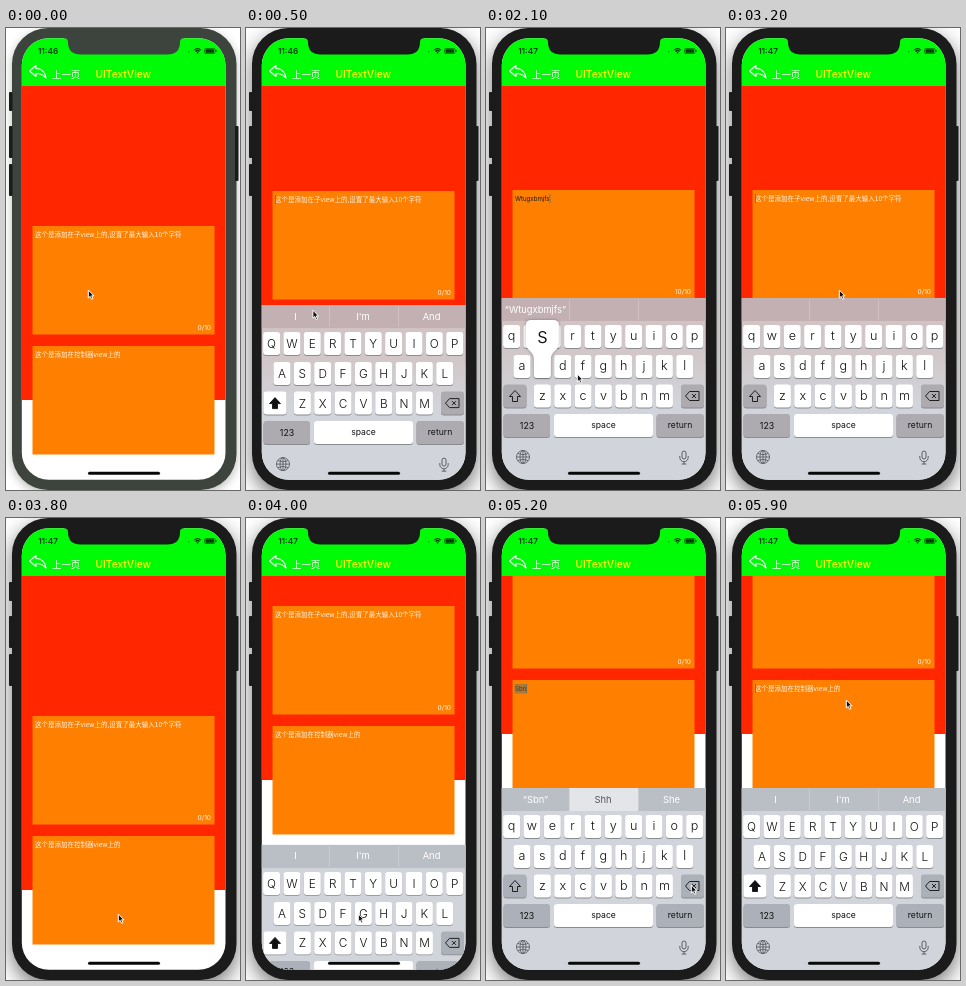
An HTML page with a canvas that plays this animation: 234 by 462 pixels, repeating every 6000 ms.

```html
<!DOCTYPE html>
<html lang="zh">
<head>
<meta charset="utf-8">
<title>UITextView</title>
<style>
html, body { margin: 0; width: 100%; height: 100%; overflow: hidden; background: #fff; }
canvas { display: block; width: 234px; height: 462px; }
</style>
</head>
<body>
<canvas id="stage" width="234" height="462"></canvas>
<script>
const g = document.getElementById('stage').getContext('2d');
const LOOP = 6000, STEP = 100;
const SANS = 'Inter, "Noto Sans CJK SC", "Noto Sans CJK", sans-serif';
const CJK = '"Noto Sans CJK SC", "Noto Sans CJK", sans-serif';
const ROWS = [
  { keys: 'qwertyuiop', x: 25.6, y: 297 },
  { keys: 'asdfghjkl', x: 36, y: 327 },
  { keys: 'zxcvbnm', x: 56.4, y: 356.5 }
];
const PITCH = 20.34, KEY_W = 17, KEY_H = 23;

// Each session: key presses [ms, letter], then held backspace.
const SESSIONS = [
  { open: 300, close: 3400, shift: 36, erase: 2400, rate: 60,
    presses: [[700, 'W'], [800, 't'], [900, 'u'], [1000, 'g'], [1100, 'x'],
              [1400, 'b'], [1500, 'm'], [1700, 'j'], [1800, 'f'], [2000, 's']] },
  { open: 3900, close: LOOP + 1000, shift: 156, erase: 4950, rate: 90,
    presses: [[4200, 'S'], [4300, 'b'], [4400, 'n'], [4500, 'h'], [4700, 'f']] }
];
const POINTER = [
  [0, 82, 262], [350, 82, 262], [700, 46, 309], [800, 87, 309], [900, 148, 309],
  [1000, 117, 338], [1100, 77, 367], [1200, 92, 370], [1300, 123, 371], [1400, 137, 367],
  [1500, 178, 367], [1700, 158, 338], [1800, 97, 338], [2000, 57, 338], [2100, 91, 346],
  [2350, 205, 367], [2950, 205, 367], [3200, 113, 262], [3400, 113, 262], [3800, 112, 396],
  [4000, 112, 396], [4200, 57, 338], [4300, 137, 367], [4400, 157, 367], [4500, 142, 354],
  [4700, 97, 338], [4950, 205, 367], [5400, 205, 367], [5800, 120, 182], [6000, 120, 182]
];

const clamp = v => Math.max(0, Math.min(1, v));
const easeOut = v => 1 - (1 - clamp(v)) ** 3;

function box(x, y, w, h, r, fill) {
  g.beginPath();
  g.roundRect(x, y, w, h, r);
  g.fillStyle = fill;
  g.fill();
}

function label(text, x, y, size, color, align = 'center', weight = 400, family = SANS) {
  g.font = `${weight} ${size}px ${family}`;
  g.textAlign = align;
  g.textBaseline = 'alphabetic';
  g.fillStyle = color;
  g.fillText(text, x, y);
}

function trace(d, color, width = 1, fill) {
  const path = new Path2D(d);
  if (fill) { g.fillStyle = fill; g.fill(path); }
  g.strokeStyle = color;
  g.lineWidth = width;
  g.lineJoin = 'round';
  g.stroke(path);
}

function sessionState(s, t) {
  const shown = easeOut((t - s.open) / 300) * (1 - easeOut((t - s.close) / 300));
  let text = s.presses.filter(p => t - p[0] >= 100).map(p => p[1]).join('');
  const erased = t > s.erase ? Math.floor((t - s.erase) / s.rate) : 0;
  text = text.slice(0, Math.max(0, text.length - erased));
  const pressed = s.presses.filter(p => t >= p[0] && t - p[0] < 200).pop();
  return { shown, text, pop: pressed && pressed[1], lift: shown * s.shift };
}

function drawPhone(active) {
  const body = active ? '#1b1b1b' : '#3d443e';
  g.fillStyle = '#fff';
  g.fillRect(0, 0, 234, 462);
  g.save();
  g.shadowColor = active ? 'rgba(0,0,0,.55)' : 'rgba(0,0,0,.28)';
  g.shadowBlur = active ? 20 : 10;
  g.shadowOffsetY = active ? 7 : 3;
  box(6, 0, 224.5, 462, 36, body);
  g.restore();
  [[3, 64, 19], [3, 98, 32], [3, 136, 32], [229, 98, 55]].forEach(
    ([x, y, h]) => box(x, y, 3.5, h, 1, '#1b1b1b'));
  return body;
}

function drawField(y, hint, text, lift, focused, counter, marked) {
  const top = Math.round(y - lift);
  g.fillStyle = '#ff8000';
  g.fillRect(26.5, top, 182, 108.5);
  if (text) label(text, 29, top + 11, 6.1, '#1e1a10', 'left');
  else label(hint, 29, top + 11, 6.5, '#fff3e4', 'left', 400, CJK);
  const width = text ? g.measureText(text).width : 0;
  if (text && marked) {
    g.fillStyle = 'rgba(70,110,120,.45)';
    g.fillRect(28.5, top + 4, width + 1, 9.5);
  }
  if (focused) {
    g.fillStyle = '#5a6a6c';
    g.fillRect(29 + width, top + 4, 0.8, 9);
  }
  if (counter) label(counter, 205, top + 104, 6.6, '#fff3e4', 'right');
}

function drawNav(t) {
  g.fillStyle = '#00fb06';
  g.fillRect(15, 10, 205, 48);
  const ink = '#063c08';
  label(t < 1700 ? '11:46' : '11:47', 42, 26.3, 8.2, ink, 'center', 600);
  [[4.8, 1.3], [2.8, 1.3]].forEach(([r, w]) => {
    g.beginPath();
    g.arc(191.5, 25.5, r, Math.PI * 1.25, Math.PI * 1.75);
    g.strokeStyle = ink;
    g.lineWidth = w;
    g.stroke();
  });
  box(190.7, 24, 1.7, 1.7, 1, ink);
  box(182, 23, 1.3, 1.3, 1, '#0a7a0e');
  g.strokeStyle = ink;
  g.lineWidth = 0.6;
  g.beginPath();
  g.roundRect(198.5, 20.5, 10.5, 5, 1.3);
  g.stroke();
  box(199.5, 21.3, 8.5, 3.4, 0.6, ink);
  box(209.6, 22, 0.9, 2, 0.4, ink);
  trace('M23.5 43L30 37.5V40.5C36 40.5 39 44 40 50C37 46.5 34 45.5 30 45.5V48.5Z', '#fff', 1.1);
  label('上一页', 46, 49.5, 9.4, '#fff', 'left', 400, CJK);
  label('UITextView', 117.3, 49.7, 10.1, '#f3f000', 'center', 600);
}

function suggestions(second, text, t) {
  if (!second) {
    if (t > 2300) return ['', '', ''];
    if (text.length > 7) return [`“${text}”`, '', ''];
    if (text) return [`“${text}”`, text.slice(0, 2) + '…', text.slice(0, 4)];
  } else if (text) {
    return [`“${text}”`, text === 'Sbn' ? 'Shh' : 'So', 'She'];
  }
  return ['I', 'I\'m', 'And'];
}

function drawKey(x, y, w, fill) {
  box(x, y + 0.9, w, KEY_H, 3, '#898c91');
  box(x, y, w, KEY_H, 3, fill);
}

function drawPop(cx, y, letter) {
  g.save();
  g.shadowColor = 'rgba(0,0,0,.35)';
  g.shadowBlur = 3;
  g.translate(cx, y - 35);
  g.fillStyle = '#fff';
  g.fill(new Path2D('M-11 0H11Q16.5 0 16.5 5V23C16.5 31 8.5 31 8.5 39V55Q8.5 58 5.5 58H-5.5Q-8.5 58 -8.5 55V39C-8.5 31 -16.5 31 -16.5 23V5Q-16.5 0 -11 0Z'));
  g.restore();
  label(letter, cx, y - 12, 21, '#111', 'center', 300);
}

function drawKeyboard(state, second, t) {
  const { text, pop } = state;
  const upper = !text && (second || t < 1000);
  const bar = second ? '#babec5' : '#c2b0b3';
  const special = second ? '#acb0b8' : '#adabb0';
  g.save();
  g.translate(0, (1 - state.shown) * 192);
  const back = g.createLinearGradient(0, 293, 0, 385);
  back.addColorStop(0, second ? '#d1d4da' : '#d2c3c4');
  back.addColorStop(0.4, second ? '#d1d4da' : '#d1c8ca');
  back.addColorStop(0.85, '#d1d4da');
  g.fillStyle = back;
  g.fillRect(15, 270, 205, 192);
  g.fillStyle = bar;
  g.fillRect(15, 270, 205, 23);

  if (second && text) {
    g.fillStyle = '#e4e5e9';
    g.fillRect(83, 270, 69, 23);
  }
  g.fillStyle = second ? '#cfd2d7' : '#d3c5c7';
  g.fillRect(83, 271, 0.8, 21);
  g.fillRect(152, 271, 0.8, 21);
  suggestions(second, text, t).forEach((word, i) => {
    const faded = !second && text && i > 0;
    const color = second && text && i === 1 ? '#55585d' : faded ? '#d9cccd' : '#fff';
    label(word, [49.5, 117, 185.5][i], 284.5, 9.4, color);
  });

  let popAt;
  for (const row of ROWS) {
    [...row.keys].forEach((key, i) => {
      const cx = row.x + i * PITCH;
      drawKey(cx - KEY_W / 2, row.y, KEY_W, '#fff');
      label(upper ? key.toUpperCase() : key, cx, row.y + (upper ? 16 : 15.3), upper ? 11.8 : 12.6, '#111', 'center', 300);
      if (pop && pop.toLowerCase() === key) popAt = [cx, row.y];
    });
  }
  drawKey(17.5, 356.5, 23, upper ? '#fff' : special);
  trace('M29 362.5L34.5 368.5H31.5V373.5H26.5V368.5H23.5Z', '#111', 0.9, upper ? '#111' : null);
  drawKey(195, 356.5, 23, special);
  trace('M199.5 368L203.5 363.5H213V372.5H203.5ZM206 366L210 370M210 366L206 370', '#111', 0.9);
  drawKey(17.5, 386, 46.5, special);
  drawKey(68, 386, 99, '#fff');
  drawKey(170.5, 386, 47.5, special);
  label('123', 41, 400.5, 8.8, '#111');
  label('space', 117.5, 400, 8.6, '#111');
  label('return', 194, 400, 8.6, '#111');

  trace('M30.5 429a6.5 6.5 0 1 0 13 0a6.5 6.5 0 1 0 -13 0M34 429a3 6.5 0 1 0 6 0a3 6.5 0 1 0 -6 0M30.5 429H43.5M37 422.5V435.5M32 425.5Q37 428 42 425.5M32 432.5Q37 430 42 432.5', '#50545a', 0.8);
  trace('M196 425a2 2 0 0 1 4 0V429a2 2 0 0 1 -4 0ZM193.8 428V429.5a4.2 4.2 0 0 0 8.4 0V428M198 433.7V436M195.7 436H200.3', '#50545a', 0.9);
  if (popAt) drawPop(...popAt, pop);
  g.restore();
}

function drawPointer(t) {
  const next = Math.max(1, POINTER.findIndex(p => p[0] > t));
  const [t0, x0, y0] = POINTER[next - 1], [t1, x1, y1] = POINTER[next];
  const k = (t - t0) / (t1 - t0);
  g.save();
  g.translate(x0 + (x1 - x0) * k, y0 + (y1 - y0) * k);
  trace('M0.3 0V8L2.2 6.4L3.6 9.3L5 8.6L3.6 5.8H6Z', '#fff', 1, '#111');
  g.restore();
}

function draw(t) {
  const second = t >= SESSIONS[1].open;
  const state = sessionState(SESSIONS[second ? 1 : 0], t);
  const { text, lift } = state;
  const body = drawPhone(t >= 300);
  g.save();
  g.beginPath();
  g.roundRect(15.8, 10.3, 203.7, 441.4, 27);
  g.clip();
  g.fillStyle = '#fff';
  g.fillRect(15, 10, 205, 442);
  g.fillStyle = '#ff2600';
  g.fillRect(15, 58, 205, Math.round(314 - lift));
  const first = second ? '' : text;
  const typing = state.shown > 0.9;
  drawField(198, '这个是添加在子view上的,设置了最大输入10个字符', first, lift, typing && !second, `${first.length}/10`);
  drawField(318, '这个是添加在控制器view上的', second ? text : '', lift, typing && second, '', true);
  drawNav(t);
  if (state.shown > 0) drawKeyboard(state, second, t);
  box(82, 443.8, 72, 3, 1.5, '#080808');
  g.restore();
  g.fillStyle = body;
  g.fill(new Path2D('M58 9H178V10.3Q174 10.3 174 14Q174 26.5 161 26.5H75Q62 26.5 62 14Q62 10.3 58 10.3Z'));
  drawPointer(t);
}

function frame() {
  draw(Math.floor(performance.now() % LOOP / STEP) * STEP);
  requestAnimationFrame(frame);
}
frame();
</script>
</body>
</html>
```
